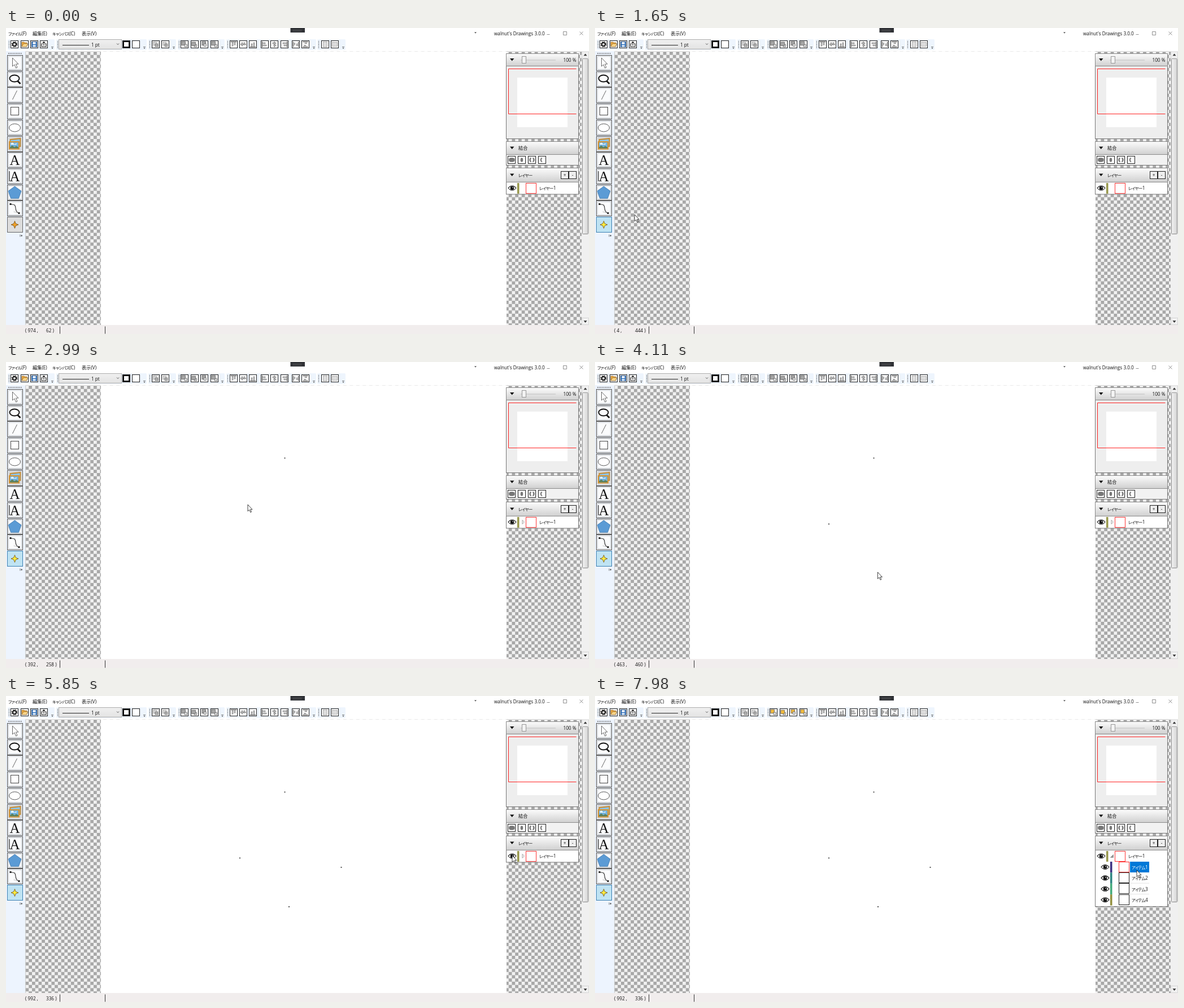
An HTML page that plays this animation: 1032x543 px, repeating every 8000 ms.

```html
<!DOCTYPE html>
<html lang="ja">
<head>
<meta charset="utf-8">
<title>Drawing editor</title>
<style>
html, body { margin: 0; width: 100%; height: 100%; overflow: hidden; background: #fff; }
svg { display: block; width: 100%; height: 100%; }
text { font: 8.2px "Open Sans", "Noto Sans CJK JP", "Noto Sans CJK", sans-serif; fill: #111; white-space: pre; }
.kana { font-size: 7.4px; letter-spacing: -.6px; font-feature-settings: "palt"; }
.serif { font: 25px "Liberation Serif", "Noto Serif", serif; }
</style>
</head>
<body>
<svg id="stage" viewBox="0 0 1032 543" xmlns="http://www.w3.org/2000/svg"></svg>
<script>
const stage = document.getElementById('stage');

// Markup helpers
const rect = (x, y, w, h, fill = 'none', stroke = 'none', more = '') =>
  `<rect x="${x}" y="${y}" width="${w}" height="${h}" fill="${fill}" stroke="${stroke}" ${more}/>`;
const path = (d, fill = 'none', stroke = 'none', width = 1, more = '') =>
  `<path d="${d}" fill="${fill}" stroke="${stroke}" stroke-width="${width}" ${more}/>`;
const text = (x, y, s, more = '') =>
  `<text x="${x}" y="${y}" ${more}>${s.replace(/[ァ-ー]+/g, '<tspan class="kana">$&</tspan>')}</text>`;
const at = (x, y, body, more = '') => `<g transform="translate(${x} ${y})" ${more}>${body}</g>`;
const iconBox = (x, y, body) => at(Math.round(x), y, rect(-6.5, -6.5, 13, 13, '#fff', '#222') + body);

const CELL = 5.74;
const defs = `<defs>
  <pattern id="check" x="${34.5 + CELL}" y="42" width="${2 * CELL}" height="${2 * CELL}" patternUnits="userSpaceOnUse">
    ${rect(0, 0, 2 * CELL, 2 * CELL, '#f1f1f1')}${rect(0, 0, CELL, CELL, '#a8a8a8')}${rect(CELL, CELL, CELL, CELL, '#a8a8a8')}
  </pattern>
  <linearGradient id="head" x2="0" y2="1"><stop stop-color="#fcfcfc"/><stop offset="1" stop-color="#d0d0d0"/></linearGradient>
  <linearGradient id="combo" x2="0" y2="1"><stop stop-color="#f0f0f0"/><stop offset="1" stop-color="#e3e3e3"/></linearGradient>
  <linearGradient id="thumb"><stop stop-color="#f4f4f4"/><stop offset="1" stop-color="#d2d2d2"/></linearGradient>
</defs>`;

function titleBar() {
  return text(4, 12.8, 'ファイル(F)') + text(47, 12.8, '編集(E)') +
    text(82, 12.8, 'キャンパス(C)') + text(134, 12.8, '表示(V)') +
    text(864, 12.8, "walnut's Drawings 3.0.0") +
    path('M829 7.5h4l-2 2z', '#333') +
    path('M957.5 11.5h5M986.5 6.5h6v6h-6zM1015.5 6.5l6 6m0-6l-6 6', 'none', '#777', .8) +
    rect(503.5, 0, 25.5, 8, '#303236') +
    path('M508 3.5h16M508 5.5h16', 'none', '#777', .8, 'stroke-dasharray="1 1"');
}

function toolbar() {
  const button = (x, body) => iconBox(x, 29, body);
  const strips = [[3, 83], [89, 160], [252, 49], [304, 83], [390, 159], [551, 50]];
  let out = strips.map(([x, w]) =>
    rect(x, 20, w, 19, '#eef5fd', 'none', 'rx="2"') +
    path(`M${x + 2.5} 23v13`, 'none', '#555', 1.2, 'stroke-dasharray="1.3 1.5"') +
    path(`M${x + w - 6} 33.5h4m-3 2h2l-1 1z`, '#444', '#444', .7)).join('');

  out += button(15, '<circle r="3" fill="none" stroke="#111" stroke-width="1.9"/>' +
    '<circle r="4.5" fill="none" stroke="#111" stroke-width="1.5" stroke-dasharray="1.8 1.73"/>');
  out += button(33, path('M-5 4v-8h4l1 1h4v7z', '#e8a33a', '#7a5520', .6) +
    path('M-5 4l3-5h8l-3 5z', '#ffd98a', '#7a5520', .6));
  out += button(50, rect(-4.5, -4.5, 9, 9, '#3d7ac0', '#1f4e86') + rect(-2.5, -4, 5, 3.5, '#fff') + rect(-2.5, 1, 5, 3.5, '#cfe0f2'));
  out += button(67, path('M-2-1h-2v5h8v-5h-2M0 2v-6.5M-2-2.5L0-4.5l2 2', 'none', '#111', 1.1));

  out += rect(93.5, 20.5, 111, 17, 'url(#combo)', '#acacac') +
    path('M100 30.5h47', 'none', '#111', .9) + text(151, 32.9, '1 pt') +
    path('M196 27.5l2 2 2-2', 'none', '#444', .9);
  out += button(213, rect(-5, -5, 10, 10, '#fff', '#111', 'stroke-width="2"')) + button(230, '');

  const group = rect(-4, -4, 5.5, 5.5, '#ddd', '#888', 'stroke-width=".7"') +
    rect(-1, -1, 5, 5, '#b0b0b0', '#666', 'stroke-width=".7"');
  const frame = rect(-5, -5, 10, 10, 'none', '#888', 'stroke-width=".7" stroke-dasharray="1.5 1"');
  out += button(265, group + frame) + button(282, group);

  // Stacking order buttons share one tint
  const order = [[-5, -5, 0, 0], [-5, -4, -1, 0], [-4, -5, -1, -1], [-5, -5, 0, 0]];
  out += '<g id="order" fill="#a6a6a6">' + [316, 334, 351, 369].map((x, i) => {
    const [a, b, c, d] = order[i];
    const grey = rect(c, d, 4.5, 4.5, '#ddd', '#555', 'stroke-width=".7"');
    const tint = `<rect x="${a}" y="${b}" width="6.5" height="6.5" stroke="#555" stroke-width=".7"/>`;
    return button(x, i % 2 ? grey + tint : tint + grey);
  }).join('') + '</g>';

  const edge = 'M-5-4.5h10', middle = 'M-5 0h10';
  const align = [[403, edge, 0], [420, middle, 0], [437, edge, 180], [458, edge, -90], [475, middle, 90], [493, edge, 90]];
  for (const [x, line, turn] of align)
    out += button(x, `<g transform="rotate(${turn})">` + path(line, 'none', '#222', .9) +
      rect(-3, -3, 2, 6, '#ccc', '#666', 'stroke-width=".6"') + rect(1, -3, 2, 4, '#ccc', '#666', 'stroke-width=".6"') + '</g>');
  const spread = path('M-4.5-4.5v9M4.5-4.5v9', 'none', '#222', .9) +
    rect(-3, -3, 2, 4.5, '#999') + rect(1, -1.5, 2, 4.5, '#999');
  out += button(513, spread) + button(530, `<g transform="rotate(90)">${spread}</g>`);
  out += button(565, rect(-3.5, -4.5, 7, 9, '#ddd', '#999', 'stroke-width=".7"'));
  out += button(582, rect(-4.5, -3.5, 9, 7, '#ddd', '#999', 'stroke-width=".7"'));
  return out;
}

function toolBox() {
  const letter = text(0, 8.5, 'A', 'class="serif" text-anchor="middle"');
  const icons = [
    path('M-4-9v15l3.5-3 2.5 6 2.5-1-2.5-6h4.5z', '#fff', '#444', .8),
    '<ellipse cx="-.5" cy="-1.5" rx="8.5" ry="6" fill="none" stroke="#111" stroke-width="1.9"/>' + path('M5 3l5 5', 'none', '#111', 2.6),
    path('M-4 8l8-16', 'none', '#555', .9),
    rect(-7, -7.5, 14, 14, '#fff', '#444'),
    '<ellipse rx="10" ry="7" fill="#fff" stroke="#444" stroke-width=".9"/>',
    path('M-8-8l18-2v14l-18 2z', '#8fc3e6', '#c98a2c', 1.8) +
      path('M-9.5-4h17v12.5h-17z', '#74b3de', '#d9942f', 2) +
      path('M-7-1q3-3 5 0t5-1v3h-10z', '#eef6fb') + path('M-8.5 7.500v-2l4-3 4 3 3-2 4 2v2z', '#5b7f58'),
    letter,
    letter + path('M-9.5-9v18', 'none', '#111', 1.1),
    path('M0-11l11.5 8.3-4.5 13h-14l-4.5-13z', '#5b9bd5', '#3e78ad', .8),
    path('M-7-7C7-8-3 3 6 8', 'none', '#222', 1.1) + path('M-7-7l8 0M6 8l-8-2', 'none', '#999', .6) +
      path('M-9-9h3v3h-3zM6 7h3v3h-3z', '#222')
  ];
  let out = rect(0, 41, 34, 486, '#edf4fe') +
    path('M4 45h24', 'none', '#444', 1.4, 'stroke-dasharray="1.3 1.5"') +
    path('M25 366.5v4m2-3v2l2-1z', '#444', '#444', .7);
  icons.forEach((icon, i) => {
    out += at(15.5, Math.round(62 + i * 28.7), rect(-13, -13.5, 27, 27, '#eef0f2', '#555') +
      rect(-11, -11.5, 23, 23, i === 5 ? '#dcdcdc' : '#fbfcfd', '#c9ced4') + icon);
  });
  return out + at(15.5, 349, rect(-13, -13.5, 27, 27, '#ddd', '#666', 'id="starBox"') +
    path('M0-6.5l1.8 4.7 4.7 1.8-4.7 1.8-1.800 4.700-1.800-4.700-4.700-1.800 4.700-1.800z', '#f2a127', '#6d4a12', .8, 'id="star"'));
}

function workspace() {
  const arrow = (y, s) => rect(1019.5, y - 6, 12, 12, '#f0f0f0', '#ccc', 'stroke-width=".7"') +
    path(`M1022.5 ${y + s}h6l-3 ${-3 * s}z`, '#333');
  return rect(34, 41.5, 985, 485.5, 'url(#check)') + rect(168, 41.5, 718, 485.5, '#fff') +
    rect(1019, 41.5, 13, 485.5, '#f0f0f0') +
    rect(1020.5, 54.5, 10, 311, 'url(#thumb)', '#888', 'rx="1"') + arrow(48, 1.3) + arrow(520.5, -1.3) +
    rect(0, 527, 1032, 16, '#f1eded') + path('M95.5 529.5v13M175.5 529.5v13', 'none', '#333');
}

const eye = (x, y) => at(x, y, path('M-7 0Q0-8 7 0Q0 8-7 0z', '#fff', '#111', 1.1) +
  '<circle r="3.3" fill="#111"/><circle cx="1" cy="-1" r=".8" fill="#fff"/>');

function panels() {
  const head = (y, h) => rect(885.5, y, 128, h, 'url(#head)', '#8a8a8a') +
    path(`M892 ${y + h / 2 - 2.5}h7.5l-3.75 4.5z`, '#111');
  const body = (y, h, fill, more = '') => rect(885.5, y, 128, h, fill, '#777', more);

  let out = body(67.5, 129, '#eee') + head(45.5, 22) +
    path('M911 57h62', 'none', '#ccc', 1.5) + rect(913.5, 50.5, 7, 12, '#f2f2f2', '#999') + text(986.5, 60, '100 %') +
    rect(905, 88, 89, 88, '#fff') + path('M1009.5 72.5h-120v80h120', 'none', '#f22');

  out += body(224.5, 19, '#f2f2f2') + head(201.5, 23) + text(907, 216.2, '結合');
  const shapes = [
    '<ellipse cx="-1" rx="4" ry="3.8" fill="#777"/><ellipse cx="1.500" rx="4" ry="3.8" fill="#777"/>',
    '<ellipse rx="2.3" ry="3.8" fill="#777"/>',
    path('M-1.5-4a4.2 4.2 0 0 0 0 8q-2-4 0-8zM1.5-4a4.2 4.2 0 0 1 0 8q2-4 0-8z', '#777', '#777', .8),
    path('M0-4a4.2 4.2 0 0 0 0 8q-3-4 0-8z', '#777', '#777', .8)
  ];
  shapes.forEach((s, i) => out += iconBox(894.8 + i * 17.9, 234, s));

  out += body(273.5, 21.5, '#fff', 'id="layers"') + head(248.5, 25) + text(907, 264, 'レイヤー') +
    rect(982.5, 254.5, 13, 13, '#eee', '#222') + rect(996.5, 254.5, 13, 13, '#eee', '#222') +
    text(989, 263.5, '+', 'text-anchor="middle"') + text(1003, 263.5, '-', 'text-anchor="middle"') +
    eye(896, 284) + rect(905, 275, 3.5, 19, '#98984c') + rect(920.5, 275.5, 18, 18, '#fff', '#f33') +
    text(944, 287.3, 'レイヤー1') +
    path('M914 280.5v7l3.5-3.5z', '#fff', '#888', .8, 'id="closed"') +
    path('M917.5 281.5v5h-5z', '#999', '#777', .7, 'id="open"');

  out += '<g id="items">' + ['#3d3182', '#2d8581', '#43ab7b', '#93903f'].map((color, i) => {
    const y = 303.5 + i * 19.4;
    return eye(903, y) + rect(912, y - 9.5, 3.5, 19.4, color) +
      (i < 3 ? path(`M947 ${y + 9.3}h34`, 'none', '#ddd', .8) : '') +
      (i ? '' : rect(947, 294, 34, 19, '#0078d7', 'none', 'id="mark"')) +
      rect(927.5, Math.round(y) - 9.5, 18, 18, '#fff', '#222', `id="box${i}"`) +
      text(950, y + 3.2, 'アイテム' + (i + 1), `id="item${i}"`);
  }).join('') + '</g>';
  return out;
}

const clicks = [[2850, 493.5, 170.5], [3410, 414, 287.5], [4180, 501, 374], [4670, 593.5, 304]];

stage.innerHTML = defs + rect(0, 0, 1032, 543, '#fff') + workspace() + titleBar() + toolbar() + toolBox() + panels() +
  clicks.map(([, x, y], i) => rect(x - 1, y - 1, 2, 2, '#555', 'none', `id="dot${i}"`)).join('') +
  text(34, 539.8, '', 'id="posX"') + text(71, 539.8, '', 'id="posY"') +
  path('M0 0V11.8L2.7 9.3 4.7 13.8 6.5 13 4.6 8.7H8z', '#fff', '#111', .8, 'id="cursor"');

const el = id => document.getElementById(id);
const show = (id, on) => el(id).setAttribute('visibility', on ? 'visible' : 'hidden');
const set = (id, name, value) => el(id).setAttribute(name, value);

// Pointer route: time, x, y
const route = [
  [260, 942, 530], [470, 800, 470], [680, 450, 400], [820, 171, 361.5], [1030, 26, 345],
  [1170, 14, 350], [1380, 16, 348], [1520, 40, 343], [1650, 70, 331], [1860, 254, 232],
  [2070, 323, 216], [2280, 375, 211], [2710, 492, 161], [2780, 493, 170], [2850, 493, 170],
  [2946, 449.5, 227.8], [2990, 428, 253], [3200, 414, 287], [3480, 414, 287], [3550, 416, 300],
  [3760, 443, 309], [3970, 500.4, 372.9], [4250, 500.4, 372.9], [4390, 532, 364], [4530, 566, 347],
  [4600, 593, 304], [4740, 593, 304], [4950, 800, 121], [5020, 947, 180], [5230, 850, 292],
  [5300, 850, 292], [5360, 880, 284], [5500, 896, 283], [5850, 896, 283], [6130, 907, 288],
  [6340, 915, 284], [6960, 915, 284], [7310, 959, 309]
];

function pointer(t) {
  const i = route.findIndex(p => p[0] > t);
  if (i === 0) return route[0].slice(1);
  if (i < 0) return route[route.length - 1].slice(1);
  const [t0, x0, y0] = route[i - 1], [t1, x1, y1] = route[i];
  const k = (t - t0) / (t1 - t0);
  return [x0 + (x1 - x0) * k, y0 + (y1 - y0) * k];
}

// Screen updates come every 70 ms within each burst
const bursts = [0, 260, 1100, 1650, 1930, 2780, 3620, 4460, 5360, 6200, 7030, 7840];
function snap(t) {
  const start = bursts.filter(b => b <= t).pop();
  return start + Math.floor((t - start) / 70) * 70;
}

// Canvas coordinates; they freeze while the pointer is outside
function readout(t) {
  if (t < 350) return [974, 62];
  if (t >= 820 && t < 1800) return [4, 444];
  if (t >= 5360) return [992, 336];
  const [x, y] = pointer(t - 44);
  return [(Math.min(885, Math.max(168, x)) - 168) / .718, (y - 42.5) / .718].map(Math.round);
}

function draw(time) {
  const t = snap(time);
  const [x, y] = pointer(t);
  show('cursor', t >= 260);
  set('cursor', 'transform', `translate(${x} ${y})`);

  const [cx, cy] = readout(t);
  el('posX').textContent = `( ${cx} ,`;
  el('posY').textContent = `${cy} )`;

  const armed = t >= 1310;
  set('starBox', 'fill', armed ? '#bfe3f3' : '#ddd');
  set('starBox', 'stroke', armed ? '#3c7fb1' : '#666');
  set('star', 'fill', armed ? '#ffee3c' : '#f2a127');
  clicks.forEach(([when], i) => show('dot' + i, t >= when));

  const open = t >= 6480, picked = t >= 7840;
  show('closed', t >= clicks[0][0] && !open);
  show('open', open);
  el('items').style.display = open ? '' : 'none';
  set('layers', 'height', open ? 100 : 21.5);
  show('mark', picked);
  set('box0', 'stroke', picked ? '#f33' : '#222');
  el('item0').style.fill = picked ? '#fff' : '';
  set('order', 'fill', t >= 7910 ? '#f0b93c' : '#a6a6a6');
}

const begin = performance.now();
function tick() {
  draw((performance.now() - begin) % 8000);
  requestAnimationFrame(tick);
}
tick();
</script>
</body>
</html>
```
